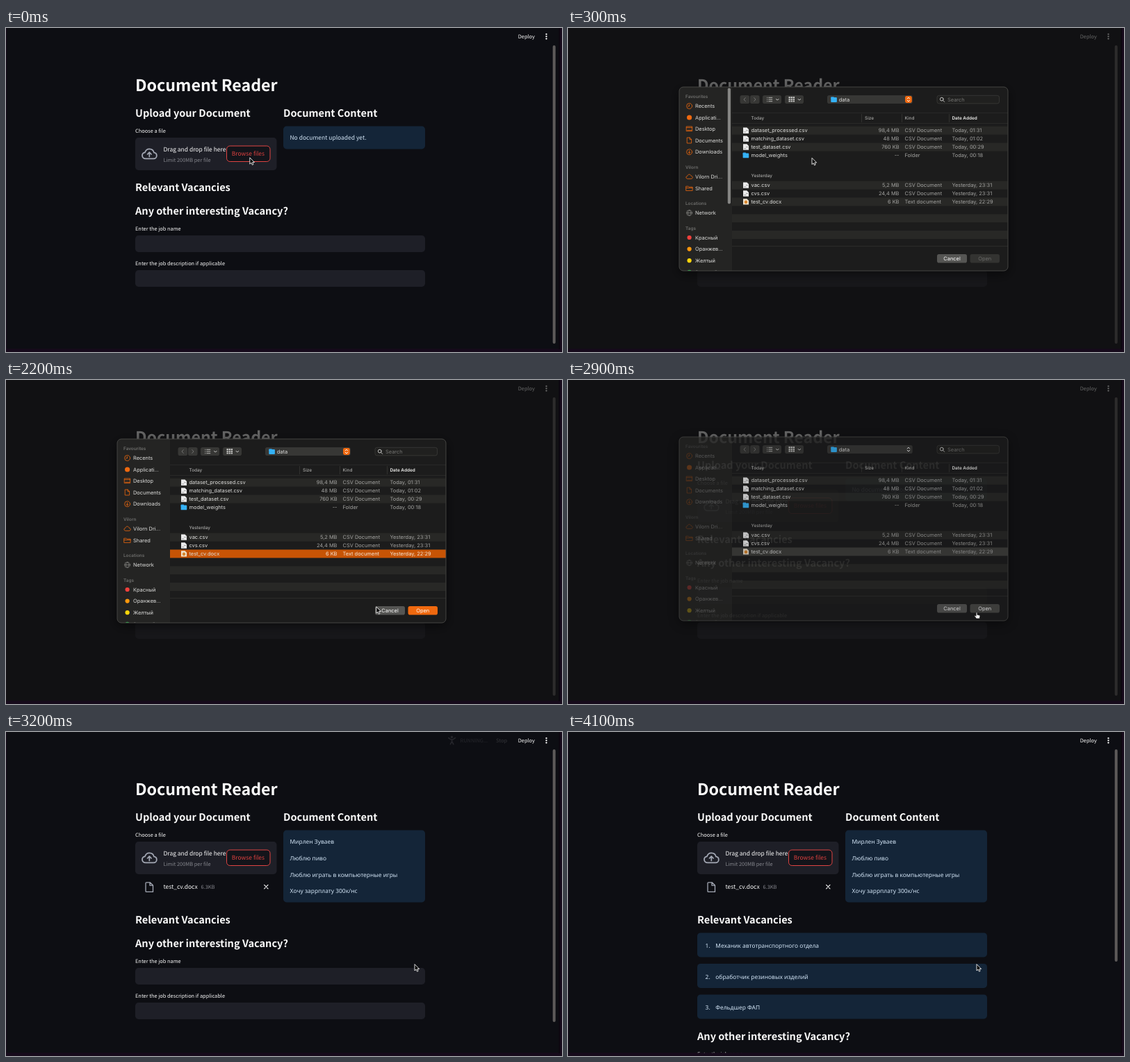
An HTML page that plays this animation: 800 px wide and 467 px high, repeating every 4.2 s.

```html
<!DOCTYPE html>
<html lang="en">
<head>
<meta charset="utf-8">
<title>Document Reader</title>
<style>
html, body { margin: 0; width: 100%; height: 100%; overflow: hidden; background: #160a1b; }
svg { display: block; width: 100%; height: 100%; text-rendering: geometricPrecision; }
text { white-space: pre; }
.page { font-family: "Noto Sans CJK JP", "Noto Sans CJK SC", "Noto Sans", sans-serif; fill: #fafafa; }
.h1 { font-size: 23.2px; font-weight: 700; }
.h3 { font-size: 14.55px; font-weight: 600; }
.body { font-size: 8.48px; }
.label { font-size: 7.41px; }
.soft { fill: #85868d; }
.red { fill: #dc403f; }
.info { fill: #d3e5f6; }
.cyr { font-family: "Noto Sans", sans-serif; font-size: 8.4px; fill: #d3e5f6; }
.mac { font-family: Inter, "Noto Sans", sans-serif; font-size: 7.45px; fill: #dededc; }
.mac .dim { fill: #a3a3a1; }
.mac .head { font-size: 6.4px; font-weight: 600; fill: #6f6f6d; }
.mac .col { font-size: 6.4px; font-weight: 500; fill: #a9a9a7; }
.mac .bold { font-size: 6.4px; font-weight: 600; fill: #f0f0ee; }
.line { fill: none; stroke-linecap: round; stroke-linejoin: round; }
</style>
</head>
<body>
<svg id="stage" viewBox="0 0 800 467" preserveAspectRatio="none"></svg>
<script>
const LOOP = 4200, STEP = 100;
const ORANGE = '#f0690f';

const text = (x, y, s, cls = '', more = '') => `<text x="${x}" y="${y}" class="${cls}" ${more}>${s}</text>`;
const rect = (x, y, w, h, fill, r = 0, more = '') =>
  `<rect x="${x}" y="${y}" width="${w}" height="${h}" rx="${r}" fill="${fill}" ${more}/>`;
const line = (d, color, w = 1, more = '') =>
  `<path class="line" d="${d}" stroke="${color}" stroke-width="${w}" ${more}/>`;
const dot = (x, y, r, fill) => `<circle cx="${x}" cy="${y}" r="${r}" fill="${fill}"/>`;
const group = (id, body, more = '') => `<g id="${id}" ${more}>${body}</g>`;

const INFO = '#142538', FIELD = '#1e1f27';

function uploader() {
  return rect(186, 158, 203.5, 47, FIELD, 4.7) +
    line('M201 188.3c-3 0-5-1.9-5-4.5 0-2.4 1.7-4.2 4-4.5 .9-3.1 3.4-5 6.3-5 3.4 0 6 2.2 6.6 5.4 2.3 .2 3.9 1.9 3.9 4.2 0 2.5-1.9 4.4-4.4 4.4z', '#a3a8b4', 1.8) +
    line('M206.3 185.5v-6M203.5 182l2.8-2.8 2.8 2.8', '#a3a8b4', 1.7) +
    text(226.5, 178, 'Drag and drop file here', 'body') +
    text(226.5, 193, 'Limit 200MB per file', 'label soft') +
    rect(317.5, 170, 62.5, 22.5, '#13141a', 4.7, 'stroke="#e04442"') +
    text(324.7, 184.4, 'Browse files', 'body red');
}

function fileRow() {
  return line('M202 216.8h5.2l4.3 4.2v9.4h-9.5q-1 0-1-1v-11.6q0-1 1-1zM207 217v4.2h4.3', '#a3a8b4', 1.3) +
    text(226.5, 225.8, 'test_cv.docx', 'body') +
    text(280.5, 225.8, '6.3KB', 'label soft') +
    line('M371.6 220.4l5.4 5.4M377 220.4l-5.4 5.4', '#fafafa', 1.1);
}

function content() {
  const rows = ['Мирлен Зуваев', 'Люблю пиво', 'Люблю играть в компьютерные игры', 'Хочу заррплату 300к/нс'];
  return rect(399, 141.5, 204, 104, INFO, 4.7) +
    rows.map((s, i) => text(408.5, 161.2 + i * 23.7, s, 'cyr')).join('');
}

function vacancies() {
  const rows = ['Механик автотранспортного отдела', 'обработчик резиновых изделий', 'Фельдшер ФАП'];
  return rows.map((s, i) => {
    const y = 289.4 + i * 44.5;
    return rect(186, y, 417, 35, INFO, 4.7) +
      text(197.6, y + 21.8, i + 1 + '.', 'cyr') + text(212.3, y + 21.8, s, 'cyr');
  }).join('');
}

const form = () =>
  text(186, 269, 'Any other interesting Vacancy?', 'h3') +
  text(186, 292.3, 'Enter the job name', 'label') +
  rect(186, 299, 417, 24, FIELD, 4.7) +
  text(186, 342.3, 'Enter the job description if applicable', 'label') +
  rect(186, 349, 417, 24, FIELD, 4.7);

const running = () =>
  dot(641.5, 7.2, 1.7, '#a0a0a6') +
  line('M636.8 8.5l3 2.2h3.6l3-2.2M641.6 11v3M641.6 13.5l-2.2 4.2M641.6 13.5l2.2 4.2', '#a0a0a6', 1.6) +
  text(653.5, 15, 'RUNNING...', 'label', 'fill="#a0a0a6"') +
  text(705, 15, 'Stop', 'label');

function page() {
  return rect(1, 0, 794.5, 462.5, '#0d0e13') +
    text(186, 91.3, 'Document Reader', 'h1') +
    text(186, 128, 'Upload your Document', 'h3') +
    text(399, 128, 'Document Content', 'h3') +
    text(186, 151, 'Choose a file', 'label') +
    uploader() +
    group('empty', rect(399, 141.5, 204, 33, INFO, 4.7) + text(408.5, 161.2, 'No document uploaded yet.', 'body info')) +
    group('loaded', fileRow() + content()) +
    group('title', text(186, 235, 'Relevant Vacancies', 'h3')) +
    group('jobs', vacancies()) +
    group('form', form()) +
    group('run', running()) +
    text(736.7, 15, 'Deploy', 'label') +
    [8.9, 12.2, 15.5].map(y => dot(777.5, y, 1.15, '#fafafa')).join('') +
    rect(786.7, 25, 4, 430, '#5d5a59', 2, 'id="thumb"') +
    rect(0, 0, 795.5, 462.5, '#131313', 0, 'id="shade"');
}

// Sidebar glyphs, drawn around 0,0
const glyphs = {
  clock: c => line('M-.2-2.2V.3H-2M4 0A4 4 0 1 1-4 0A4 4 0 1 1 4 0', c, .8),
  disc: c => dot(0, 0, 3.6, c),
  desk: c => line('M-4-3.5h8v6.6h-8zM-4-1.8h8M-3 1.8h6', c, .8),
  doc: c => line('M-3-4h3.6L3-1.6V4h-6zM.4-4v2.6H3', c, .8),
  down: c => line('M4 0A4 4 0 1 1-4 0A4 4 0 1 1 4 0M0-2v4M-1.6 .5L0 2 1.6 .5', c, .8),
  cloud: c => line('M-2.8 3C-5.5 2.8-5.3-.6-2.9-.8-2.2-4 2-4 2.6-.9 5.4-.9 5.4 3 2.8 3z', c, .8),
  share: c => line('M-4.5-2.8h3l1 1h5v5.2h-9zM-4.5-.4h9', c, .8),
  globe: c => line('M4 0A4 4 0 1 1-4 0A4 4 0 1 1 4 0M-4 0h8M0-4C-2.6-2-2.6 2 0 4 2.6 2 2.6-2 0-4', c, .6),
  tag: c => dot(0, 0, 3.1, c)
};

function sidebar() {
  const heads = [[99, 'Favourites'], [201, 'Vilorn'], [253, 'Locations'], [289, 'Tags']];
  const items = [
    [112.5, 'clock', 'Recents'], [129, 'disc', 'Applicati...'], [145.5, 'desk', 'Desktop'],
    [162, 'doc', 'Documents'], [178.7, 'down', 'Downloads'],
    [214.3, 'cloud', 'Vilorn Dri...'], [231, 'share', 'Shared'],
    [266.5, 'globe', 'Network', '#9a9a98'],
    [302, 'tag', 'Красный', '#f2403c'], [318.6, 'tag', 'Оранжев...', '#ff980c'],
    [335.2, 'tag', 'Желтый', '#ffd60a'], [351.8, 'tag', 'Зеленый', '#30c94f']
  ];
  return heads.map(([y, s]) => text(169, y + 2.4, s, 'head')).join('') +
    items.map(([y, g, s, c = ORANGE]) =>
      `<g transform="translate(174.6 ${y})">${glyphs[g](c)}</g>` + text(183, y + 2.7, s)).join('');
}

const folder = (x, y) =>
  rect(x, y - 3.8, 4.5, 3, '#2b9fe8', .8) + rect(x, y - 2.9, 8.6, 6.8, '#35b2f6', .9);

const sheet = (x, y, color, mark) =>
  `<path d="M${x} ${y - 4.2}h5.4l2.6 2.6v5.8h-8z" fill="${color}"/>` + mark;

function fileIcon(kind, y) {
  if (kind === 'dir') return folder(251.6, y);
  if (kind === 'doc') return sheet(252, y, '#f1e4cf', dot(256, y + .5, 2.3, '#d9872f'));
  return sheet(252, y, '#ececec', line(`M253.5 ${y + 2.3}h2.2M256.5 ${y}h2`, '#8d8d8d', .8));
}

const files = [
  [147.7, 'csv', 'dataset_processed.csv', '98,4 MB', 'CSV Document', 'Today, 01:31'],
  [159.6, 'csv', 'matching_dataset.csv', '48 MB', 'CSV Document', 'Today, 01:02'],
  [171.5, 'csv', 'test_dataset.csv', '760 KB', 'CSV Document', 'Today, 00:29'],
  [183.4, 'dir', 'model_weights', '--', 'Folder', 'Today, 00:18'],
  [226.6, 'csv', 'vac.csv', '5,2 MB', 'CSV Document', 'Yesterday, 23:31'],
  [238.5, 'csv', 'cvs.csv', '24,4 MB', 'CSV Document', 'Yesterday, 23:31'],
  [250.4, 'doc', 'test_cv.docx', '6 KB', 'Text document', 'Yesterday, 22:29']
];

const fileRows = () => files.map(([y, kind, name, size, type, date], i) => {
  const b = y + 2.7, cls = 'dim' + (i === 6 ? ' pick' : '');
  return fileIcon(kind, y) + text(263.5, b, name) +
    text(476.5, b, size, cls, 'text-anchor="end"') + text(484.5, b, type, cls) + text(552.5, b, date, cls);
}).join('');

function toolbar() {
  const box = (x, w) => rect(x, 97, w, 12, '#373735', 2.8);
  const arrow = x => line(`M${x} 102.3l1.8 1.8 1.8-1.8`, '#c9c9c7', 1);
  const rows = [100.3, 103, 105.7];
  return box(247.5, 13.6) + box(262, 13.6) +
    line('M255.3 100.5l-2.3 2.5 2.3 2.5M267.7 100.5l2.3 2.5-2.3 2.5', '#70706e', 1) +
    box(280, 27) + rows.map(y => line(`M286.6 ${y}h.2M288.8 ${y}h5`, '#c9c9c7', .9)).join('') + arrow(299.5) +
    box(312, 27) + rows.map(y => [317.5, 320.6, 323.7].map(x => rect(x, y - 1.2, 2.3, 2, '#c9c9c7', .3)).join('')).join('') + arrow(331) +
    box(373, 122.7) + folder(378.3, 103) + text(389.8, 105.7, 'data') +
    rect(485, 98, 9.8, 10, ORANGE, 2.4, 'id="popup"') +
    line('M488.2 101.9l1.7-1.8 1.7 1.8M488.2 104.2l1.7 1.8 1.7-1.8', '#fff', 1) +
    rect(531, 97.3, 89.5, 11.6, '#20201f', 2.8, 'stroke="#3b3b39" stroke-width=".8"') +
    line('M540.2 102.6a2.4 2.4 0 1 1-4.8 0 2.4 2.4 0 1 1 4.8 0M539.6 104.4l2 2', '#c9c9c7', 1) +
    text(546, 105.7, 'Search', '', 'fill="#747472"');
}

function dialog() {
  const stripes = [141.8, 165.6, 220.7, 244.5, 268.3, 292.1]
    .map(y => rect(236, y, 396.5, 11.9, '#282826')).join('');
  return rect(160, 85, 473, 265, '#1d1d1b', 6, 'filter="url(#shadow)"') +
    `<g clip-path="url(#frame)">` +
    rect(160, 85, 76, 265, '#242423') +
    group('side', sidebar()) +
    rect(229.8, 86.5, 4.2, 167, '#858583', 2.1, 'id="sidebar"') +
    stripes + rect(236, 121.9, 397, .6, '#333331') + rect(236, 137.3, 397, .6, '#333331') +
    [422, 480, 548].map(x => rect(x, 124, .7, 12, '#3b3b39')).join('') +
    text(263.5, 132.4, 'Today', 'col') + text(427, 132.4, 'Size', 'col') +
    text(484.5, 132.4, 'Kind', 'col') + text(552.5, 132.4, 'Date Added', 'bold') +
    text(263.5, 214.6, 'Yesterday', 'col') +
    rect(236, 244.5, 397, 11.9, '#c75405', 0, 'id="select"') +
    fileRows() + toolbar() +
    rect(236, 314.2, 397, .7, '#333331') +
    rect(531, 326, 43, 12.5, '#555553', 2.8) + text(552.5, 334.9, 'Cancel', '', 'text-anchor="middle" fill="#fff"') +
    rect(578.5, 326, 42.5, 12.5, '#333331', 2.8, 'id="open"') +
    text(599.7, 334.9, 'Open', '', 'id="openText" text-anchor="middle"') +
    '</g>' + rect(160, 85, 473, 265, 'none', 6, 'stroke="#4b4b49" stroke-width=".9"');
}

const stage = document.getElementById('stage');
stage.innerHTML = `<defs>
  <clipPath id="view"><rect width="795.5" height="462.5"/></clipPath>
  <clipPath id="frame"><rect x="160" y="85" width="473" height="265" rx="6"/></clipPath>
  <filter id="shadow" x="-10%" y="-15%" width="120%" height="130%">
    <feDropShadow dx="0" dy="4" stdDeviation="8" flood-color="#000" flood-opacity=".55"/></filter>
  </defs>` +
  rect(0, 0, 800, 467, '#160a1b') +
  rect(795.5, 0, 1.2, 463, '#08060a') +
  group('page', page(), 'class="page" clip-path="url(#view)"') +
  group('dialog', dialog(), 'class="mac"') +
  group('arrow', '<path d="M0 0V9.3L2.1 7.4 3.5 10.5 5.1 9.8 3.8 6.8H6.7Z" fill="#050505" stroke="#f4f4f4" stroke-width=".9" stroke-linejoin="round"/>') +
  group('hand', '<path d="M-.9 .6q.9-1.2 1.8 0v3l3 .7q1.2.4 1 1.6l-.7 3.3h-4.6l-2.7-3.6q-.2-1.3 1.2-.8l1 .8z" fill="#f4f4f4" stroke="#111" stroke-width=".7"/>');

const el = {};
stage.querySelectorAll('[id]').forEach(n => el[n.id] = n);
const picked = stage.querySelectorAll('.pick');

// Keys are [time, ...values], joined by straight runs
function track(keys, t) {
  const i = keys.findIndex(k => k[0] > t);
  if (i < 0) return keys[keys.length - 1].slice(1);
  if (i === 0) return keys[0].slice(1);
  const a = keys[i - 1], b = keys[i], p = (t - a[0]) / (b[0] - a[0]);
  return a.slice(1).map((v, k) => v + (b[k + 1] - v) * p);
}

const pointer = [[0, 350.8, 186.8], [300, 351, 187.3], [700, 351, 188], [1000, 338, 226], [1200, 331.3, 241],
  [1400, 325, 247], [1700, 325, 247], [1800, 345, 256], [1900, 345, 256], [2200, 532.8, 326.8], [2500, 588, 334.7]];
const sheetFade = [[0, 0], [100, .35], [200, .85], [300, 1], [2700, 1], [2800, .95], [2900, .8], [3000, .35], [3100, 0]];
const shadeFade = [[0, 0], [100, .25], [200, .5], [300, .64], [2900, .64], [3000, .35], [3100, 0]];

const show = (node, v) => node.setAttribute('opacity', +v);
const move = (node, x, y) => node.setAttribute('transform', `translate(${x} ${y})`);
const fill = (node, c) => node.setAttribute('fill', c);

function draw(t) {
  const loaded = t >= 3200, listed = t >= 3600;
  show(el.empty, !loaded);
  show(el.loaded, loaded);
  show(el.jobs, listed);
  move(el.title, 0, loaded ? 41 : 0);
  move(el.form, 0, listed ? 174.7 : loaded ? 41 : 0);
  el.thumb.setAttribute('height', listed ? 306 : loaded ? 393 : 430);
  show(el.run, loaded && !listed ? track([[3200, .16], [3400, .8]], t)[0] : 0);
  show(el.shade, track(shadeFade, t)[0]);

  const [fade] = track(sheetFade, t);
  show(el.dialog, fade);
  move(el.dialog, 0, -15 * (1 - fade));
  show(el.side, Math.max(0, 1 - 3.2 * (1 - fade)));
  show(el.sidebar, track([[700, 1], [1000, 0]], t)[0]);

  const chosen = t >= 1400, idle = t >= 2700;
  show(el.select, chosen);
  fill(el.select, idle ? '#3e3e3c' : '#c75405');
  picked.forEach(n => n.style.fill = chosen && !idle ? '#f6e6d8' : '');
  fill(el.popup, idle ? '#373735' : ORANGE);
  fill(el.open, idle ? '#484846' : !chosen ? '#333331' : t === 2600 ? '#ff8a35' : ORANGE);
  fill(el.openText, chosen ? '#fff' : '#6c6c6a');

  const [x, y] = track(pointer, t), hand = t >= 2800 && t < 3200;
  show(el.arrow, !hand);
  show(el.hand, hand);
  move(el.arrow, x, y);
  move(el.hand, x, y);
}

const start = performance.now();
function tick(now) {
  const t = Math.max(0, now - start) % LOOP;
  draw(Math.floor(t / STEP) * STEP);
  requestAnimationFrame(tick);
}
draw(0);
requestAnimationFrame(tick);
</script>
</body>
</html>
```
